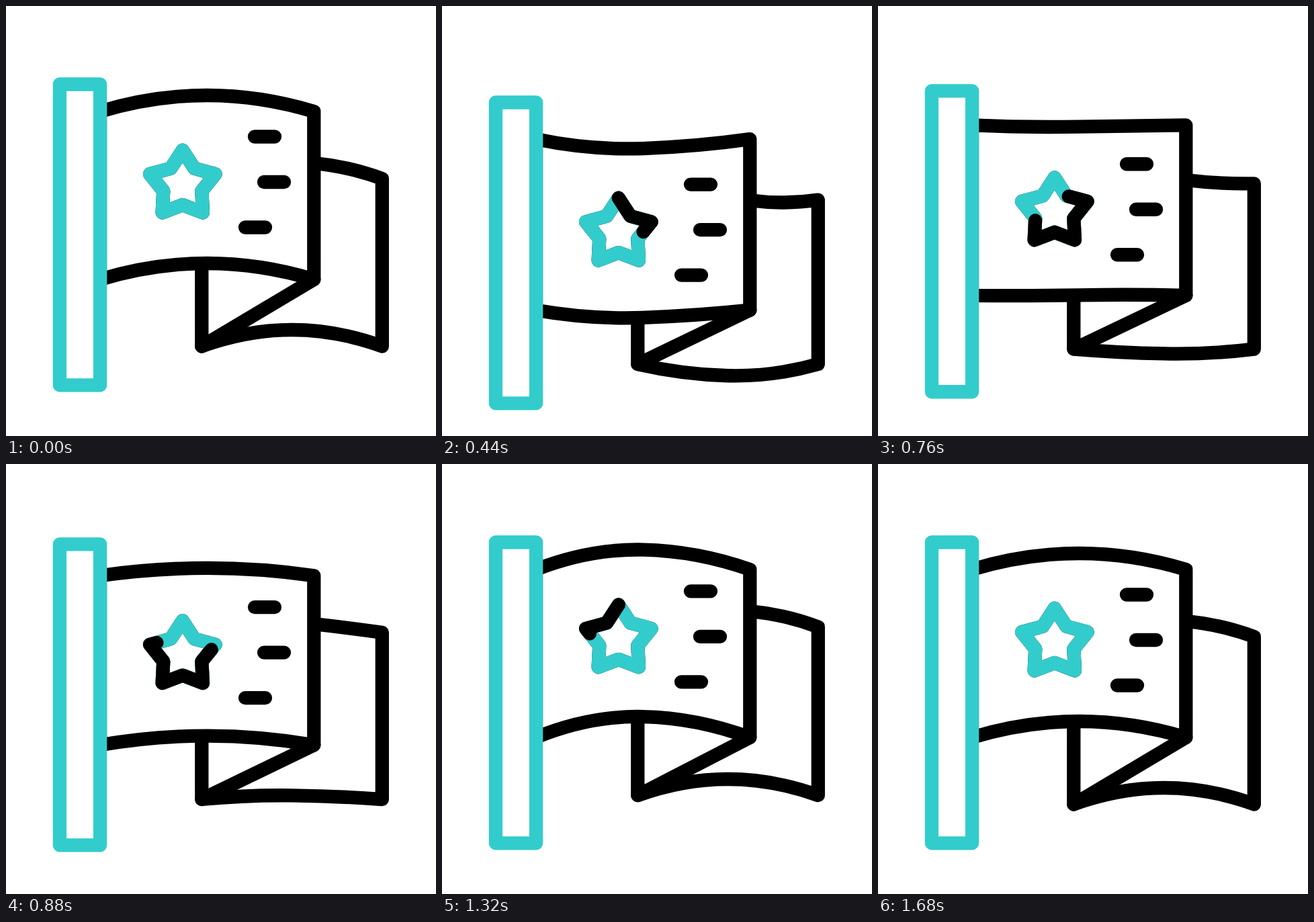
Animation of 640x640 px, one loop 2000 ms. Source, as an HTML page:

```html
<!DOCTYPE html>
<html lang="en">
<head>
<meta charset="utf-8">
<title>Waving flag</title>
<style>
  html, body { margin: 0; width: 100%; height: 100%; overflow: hidden; background: #fff; }
  svg { display: block; width: 100vw; height: 100vh; }
  path { fill: none; stroke: #000; stroke-width: 20.3; stroke-linecap: round; stroke-linejoin: round; }
  .solid { fill: #fff; }
  .teal { stroke: #33cccc; }
</style>
</head>
<body>
<svg viewBox="0 0 640 640">
  <g id="rig">
    <path id="back"/>
    <path id="fold"/>
    <path id="front" class="solid"/>
    <g id="emblem">
      <path d="M370 194.5h30M384 262h30M356 329.5h30"/>
      <path class="star"/>
      <path class="star teal"/>
      <path class="star" id="trace" pathLength="1"/>
    </g>
    <path class="solid teal" d="M79.9 116.5H140.1V564.4H79.9Z"/>
  </g>
</svg>
<script>
const LOOP = 2000, STEP = 40;
const POLE = 140, CORNER = 458.3, FOLD = 291.3, END = 559.8;
const $ = id => document.getElementById(id);
const shape = (id, d) => $(id).setAttribute('d', d);
const shift = (id, y) => $(id).setAttribute('transform', `translate(0 ${y})`);

const ease = (t, a, b) => {
  const u = Math.min(1, Math.max(0, (t - a) / (b - a)));
  return u * u * (3 - 2 * u);
};

function starPath(cx, cy, outer, inner) {
  const points = Array.from({ length: 10 }, (_, i) => {
    const a = i * Math.PI / 5, r = i % 2 ? inner : outer;
    return [cx + r * Math.sin(a), cy - r * Math.cos(a)];
  });
  return `M${points.join('L')}Z`;
}

// Symmetric wave between x0 and x1: two parabolas that meet at the crest.
function wave(x0, x1, edge, crest, tilt) {
  const mid = (x0 + x1) / 2, q = (x1 - x0) / 4;
  return `${x0} ${edge}Q${mid - q} ${crest - tilt * q} ${mid} ${crest}` +
         `Q${mid + q} ${crest + tilt * q} ${x1} ${edge}`;
}

function draw(t) {
  const sag = ease(t, 80, 520) - ease(t, 520, 1160);
  const lift = ease(t, 520, 1160) - ease(t, 1160, 1680);
  const mix = (rest, low, high) => rest + sag * (low - rest) + lift * (high - rest);

  const edge = mix(157, 172.5, 157);
  const crest = mix(133, 190, 126);
  const tilt = mix(0, -0.038, 0.026);
  const low = edge + mix(250, 255, 250);
  const lowCrest = crest + mix(250, 252, 248);
  const foldY = mix(506.5, 506, 489.3);
  const tail = mix(257, 262, 238.3);

  shape('front', `M${wave(POLE, CORNER, edge, crest, tilt)}L${wave(CORNER, POLE, low, lowCrest, tilt)}Z`);
  shape('back', `M${CORNER} ${mix(233.8, 265, 214.8)}` +
    `Q${(CORNER + END) / 2} ${mix(238.6, 272, 219.2)} ${END} ${tail}` +
    `L${wave(END, FOLD, foldY, mix(482, 527.2, 465.2), mix(0, 0.03, 0))}`);
  shape('fold', `M${FOLD} ${lowCrest}V${foldY}L${CORNER} ${low}`);
  shift('emblem', mix(0, 48.3, -6.7));
  shift('rig', 27.2 * (ease(t, 120, 410) - ease(t, 410, 1000)));

  const from = ease(t, 520, 1680), to = ease(t, 80, 1160);
  const trace = $('trace').style;
  trace.display = to > from ? '' : 'none';
  trace.strokeDasharray = `${to - from} 2`;
  trace.strokeDashoffset = -from;
}

const star = starPath(262.8, 266, 51.3, 30);
document.querySelectorAll('.star').forEach(p => p.setAttribute('d', star));

const start = performance.now();
function tick(now) {
  const t = Math.max(0, now - start) % LOOP;
  draw(Math.floor(t / STEP) * STEP);
  requestAnimationFrame(tick);
}
draw(0);
requestAnimationFrame(tick);
</script>
</body>
</html>
```
